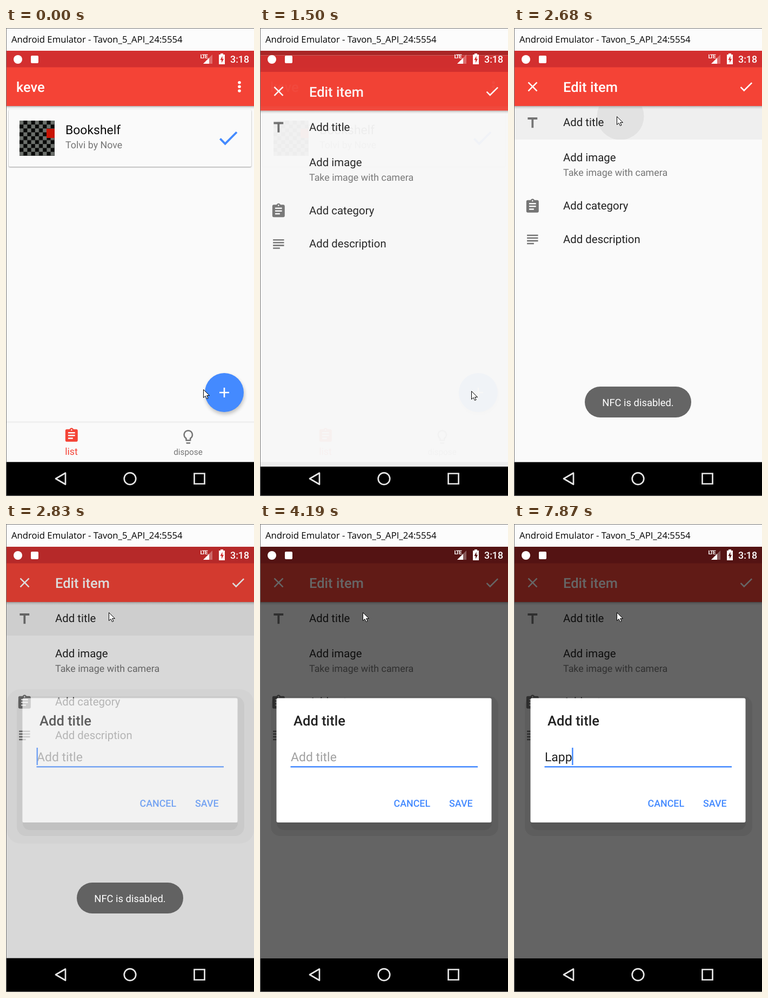
An HTML page for the animation above (8 s loop, 459 px wide and 864 px high).

```html
<!DOCTYPE html>
<html lang="en">
<head>
<meta charset="utf-8">
<title>Add an item</title>
<style>
html, body { margin: 0; width: 100%; height: 100%; overflow: hidden; background: #fafafa; }
svg { display: block; width: 459px; height: 864px; }
text { font-family: Roboto, sans-serif; white-space: pre; text-rendering: geometricPrecision; }
.medium { font-weight: 500; }
.title { font-size: 25.5px; font-weight: 500; }
.row { font-size: 20.4px; fill: #212121; }
.sub { font-size: 17.85px; fill: #757575; }
.input { font-size: 22.95px; }
.button { font-size: 17.85px; font-weight: 500; fill: #448aff; }
</style>
</head>
<body>
<svg viewBox="0 0 459 864">
  <defs>
    <linearGradient id="shadow" x2="0" y2="1">
      <stop stop-opacity=".3"/><stop offset=".4" stop-opacity=".1"/><stop offset="1" stop-opacity="0"/>
    </linearGradient>
    <filter id="soft" x="-30%" y="-30%" width="160%" height="160%"><feGaussianBlur stdDeviation="3.5"/></filter>
    <filter id="thin" x="-5%" y="-10%" width="110%" height="120%"><feGaussianBlur stdDeviation="1"/></filter>
    <pattern id="checks" x="25" y="171" width="14.4" height="14.4" patternUnits="userSpaceOnUse">
      <path fill="#070807" d="M0 0h14.4v14.4H0z"/><path fill="#6c706c" d="M0 0h7.2v7.2H0zM7.2 7.2h7.2v7.2H7.2z"/>
    </pattern>
    <clipPath id="rowClip"><path d="M1 145h458v61H1z"/></clipPath>
    <clipPath id="aroundSheet"><path clip-rule="evenodd" d="M0 0h459v864H0zM30.500 321.500h398V551H30.500z"/></clipPath>
    <path id="check" d="M9 16.17 4.83 12l-1.42 1.41L9 19 21 7l-1.41-1.41z"/>
    <path id="close" d="M19 6.41 17.59 5 12 10.59 6.41 5 5 6.41 10.59 12 5 17.59 6.41 19 12 13.41 17.59 19 19 17.59 13.41 12z"/>
    <path id="clip" d="M19 3h-4.18C14.4 1.84 13.3 1 12 1s-2.4.84-2.82 2H5c-1.1 0-2 .9-2 2v14c0 1.1.9 2 2 2h14c1.1 0 2-.9 2-2V5c0-1.1-.9-2-2-2zm-7 0c.55 0 1 .45 1 1s-.45 1-1 1-1-.45-1-1 .45-1 1-1zm2 14H7v-2h7zm3-4H7v-2h10zm0-4H7V7h10z"/>
    <path id="bulb" d="M9 21c0 .55.45 1 1 1h4c.55 0 1-.45 1-1v-1H9zm3-19C8.14 2 5 5.14 5 9c0 2.38 1.19 4.47 3 5.74V17c0 .55.45 1 1 1h6c.55 0 1-.45 1-1v-2.26c1.81-1.27 3-3.36 3-5.74 0-3.86-3.14-7-7-7zm2.85 11.1-.85.6V16h-4v-2.3l-.85-.6C7.8 12.16 7 10.63 7 9c0-2.76 2.24-5 5-5s5 2.24 5 5c0 1.63-.8 3.16-2.15 4.1z"/>
  </defs>

  <!-- window frame and navigation bar -->
  <path fill="#fcfcfc" d="M0 0h459v42H0z"/>
  <text x="10" y="26.5" style="font:16.7px 'Open Sans',sans-serif">Android Emulator - Tavon_5_API_24:5554</text>
  <path d="M0 801h459v63H0z"/>
  <g fill="none" stroke="#e6e6e6" stroke-width="2.7">
    <path d="M110 821.5 92 832l18 10.5z" stroke-linejoin="round"/>
    <circle cx="229.5" cy="832" r="10.8"/>
    <path d="M348.5 822.5h19v19h-19z"/>
  </g>

  <g id="list">
    <path fill="#fafafa" d="M1 42h458v759.25H1z"/>
    <path fill="url(#shadow)" d="M1 144h458v6H1z"/>
    <path fill="#d32f2f" d="M1 42h458v31H1z"/>
    <path fill="#f44336" d="M1 72.5h458V144H1z"/>
    <text class="title" x="19" y="118" fill="#fff">keve</text>
    <g fill="#fff">
      <circle cx="432" cy="100.7" r="2.8"/><circle cx="432" cy="108.3" r="2.8"/><circle cx="432" cy="116" r="2.8"/>
    </g>
    <rect x="5" y="152" width="449" height="105" rx="2" opacity=".4" filter="url(#thin)"/>
    <rect x="5" y="151" width="449" height="105" rx="2" fill="#fafafa"/>
    <path fill="url(#checks)" d="M25 171h65v65H25z"/>
    <path fill="#c81505" d="M75 186h15v17H75z"/>
    <text class="input" x="110" y="196" fill="#0c0c0c">Bookshelf</text>
    <text class="sub" x="110" y="222">Tolvi by Nove</text>
    <use href="#check" transform="translate(388.5 180.3) scale(1.9)" fill="#448aff"/>
    <circle cx="405" cy="677" r="36" opacity=".24" filter="url(#soft)"/>
    <circle cx="404" cy="673" r="36" fill="#448aff"/>
    <circle id="press" cx="404" cy="673" r="36" fill="#fff" opacity=".2"/>
    <path d="M395 673h18M404 664v18" stroke="#fff" stroke-width="2.6"/>
    <path opacity=".04" d="M1 726h458v3H1z"/>
    <path fill="#fafafa" d="M1 729h458v72H1z"/>
    <g fill="#f44336">
      <use href="#clip" transform="translate(106 737) scale(1.275)"/>
      <text x="121" y="788" font-size="17.85" text-anchor="middle">list</text>
    </g>
    <g fill="#757575">
      <use href="#bulb" transform="translate(322 739.5) scale(1.275)"/>
      <text x="337" y="788" font-size="15.3" text-anchor="middle">dispose</text>
    </g>
    <path id="listDim" d="M1 42h458v759H1z" opacity=".2"/>
  </g>

  <g id="edit">
    <path fill="#fafafa" d="M1 42h458v759.25H1z"/>
    <path id="rowPress" fill="#efefef" d="M1 145h458v61H1z"/>
    <circle id="ripple" cx="197" cy="163" r="43.5" fill="#e2e2e2" clip-path="url(#rowClip)"/>
    <path fill="url(#shadow)" d="M1 144h458v6H1z"/>
    <path fill="#d32f2f" d="M1 42h458v31H1z"/>
    <path fill="#f44336" d="M1 72.5h458V144H1z"/>
    <g fill="#fff">
      <use href="#close" transform="translate(19.2 93) scale(1.275)"/>
      <text class="title" x="91" y="118">Edit item</text>
      <use href="#check" transform="translate(414.3 93) scale(1.275)"/>
    </g>
    <g fill="#757575">
      <path d="M5 4v3h5.5v12h3V7H19V4z" transform="translate(19 160) scale(1.275)"/>
      <use href="#clip" transform="translate(19 314) scale(1.275)"/>
      <path d="M14 17H4v2h10zM20 9H4v2h16zM4 15h16v-2H4zM4 5v2h16V5z" transform="translate(19 375) scale(1.275)"/>
    </g>
    <text class="row" x="91" y="181">Add title</text>
    <text class="row" x="91" y="246">Add image</text>
    <text class="sub" x="91" y="273">Take image with camera</text>
    <text class="row" x="91" y="335">Add category</text>
    <text class="row" x="91" y="396.5">Add description</text>
  </g>

  <path id="dim" d="M1 42h458v759.25H1z"/>

  <g fill="#fff">
    <circle cx="22" cy="58" r="8"/>
    <rect x="46" y="51" width="14" height="14" rx="2"/>
    <text x="359.5" y="55.5" font-size="10.2" font-weight="700" letter-spacing="-1.2">LTE</text>
    <path opacity=".3" d="M382 49v17h-17z"/>
    <path d="M376 55v11h-11z"/>
    <path d="M397 47h5v2h3v18h-11V49h3z"/>
    <path id="bolt" d="M400.5 51.5V57h2.5l-4 7.5V59h-2.5z"/>
    <text class="medium" x="415" y="64" font-size="17.85">3:18</text>
  </g>

  <g id="dialog">
    <g clip-path="url(#aroundSheet)">
      <rect id="halo" x="1" y="305" width="458" height="285" rx="26" opacity=".03"/>
      <rect x="20" y="318" width="421" height="258" rx="17" opacity=".07"/>
      <rect x="31" y="330" width="398" height="235" rx="13" opacity=".07"/>
    </g>
    <rect x="30.5" y="321.5" width="398" height="229.5" rx="3" fill="#fff"/>
    <text class="title" x="62" y="372" fill="#212121">Add title</text>
    <text class="input" id="hint" x="57" y="438" fill="#a0a0a0">Add title</text>
    <text class="input" id="typed" x="57" y="438" fill="#212121"></text>
    <path fill="#448aff" d="M56.5 447H403v2.5H56.5z"/>
    <rect id="caret" y="413" width="2.5" height="32" fill="#448aff"/>
    <text class="button" x="247.5" y="522">CANCEL</text>
    <text class="button" x="350" y="522">SAVE</text>
  </g>

  <g id="toast">
    <rect x="131" y="662" width="197" height="57" rx="28.5" fill="#545454" opacity=".893"/>
    <text x="229.5" y="698" font-size="18.4" text-anchor="middle" fill="#fff">NFC is disabled.</text>
  </g>

  <path id="cursor" fill="#fff" stroke="#000" d="M.5.5v15L4 12.3l2.5 5.2L9 16.4l-2.4-4.9h4.9z"/>
  <path fill="#777" d="M0 0h1v864H0zM0 0h459v1H0zM0 863h459v1H0z"/>
</svg>
<script>
const LOOP = 8000;
const el = Object.fromEntries([...document.querySelectorAll('svg [id]')].map(e => [e.id, e]));

// Each track lists [start time, value]; a value holds until the next entry.
const tracks = {
  cursor: [[0, [365, 667]], [120, [373, 670]], [770, [388, 670]], [920, [391, 670]], [1770, [310, 380]],
    [1890, [204, 169]], [2040, [205, 173]], [2160, [197, 168]], [2280, [190, 163]]],
  press: [[0, 0], [1380, 1], [1500, 0]],
  edit: [[0, 0], [1500, .95], [1620, 1]],
  row: [[0, 0], [2680, 1], [2980, 0]],
  ripple: [[0, 0], [2680, 1], [2830, 0]],
  dim: [[0, 0], [2830, .136], [2980, .6]],
  dialog: [[0, 0], [2830, .67], [2980, 1]],
  toast: [[0, 0], [1770, .5], [1890, 1], [3250, .85], [3370, .65], [3520, .4], [3640, .2], [3760, 0]],
  caret: [[0, 1], [3250, 0], [3640, 1], [4190, 0], [4720, 1], [5150, 0], [5710, 1], [6290, 0], [6670, 1]],
  typed: [[0, ''], [6670, 'L'], [7070, 'La'], [7190, 'Lap'], [7340, 'Lapp'], [7590, 'Lappt'], [7870, 'Lapp']]
};
const valueAt = (name, t) => tracks[name].findLast(step => step[0] <= t)[1];
const show = (e, on) => e.style.display = on ? '' : 'none';
const fade = (e, alpha) => { show(e, alpha > 0); e.style.opacity = alpha; };

function draw(t) {
  const v = Object.fromEntries(Object.keys(tracks).map(name => [name, valueAt(name, t)]));
  const sliding = v.edit > 0 && v.edit < 1;
  el.cursor.setAttribute('transform', `translate(${v.cursor})`);
  show(el.press, v.press);
  show(el.listDim, sliding);
  fade(el.edit, v.edit);
  el.edit.setAttribute('transform', `translate(0 ${sliding ? 8.5 : 0})`);
  show(el.rowPress, v.row);
  show(el.ripple, v.ripple);
  fade(el.dim, v.dim);
  el.bolt.setAttribute('fill', v.dim > .5 ? '#541313' : '#d32f2f');
  fade(el.dialog, v.dialog);
  show(el.halo, v.dialog < 1);
  fade(el.toast, v.toast);
  if (el.typed.textContent !== v.typed) el.typed.textContent = v.typed;
  show(el.hint, !v.typed);
  show(el.caret, v.caret);
  el.caret.setAttribute('x', 56.5 + (v.typed ? el.typed.getComputedTextLength() : 0));
}

const start = performance.now();
function tick() {
  draw((performance.now() - start) % LOOP);
  requestAnimationFrame(tick);
}
tick();
</script>
</body>
</html>
```
